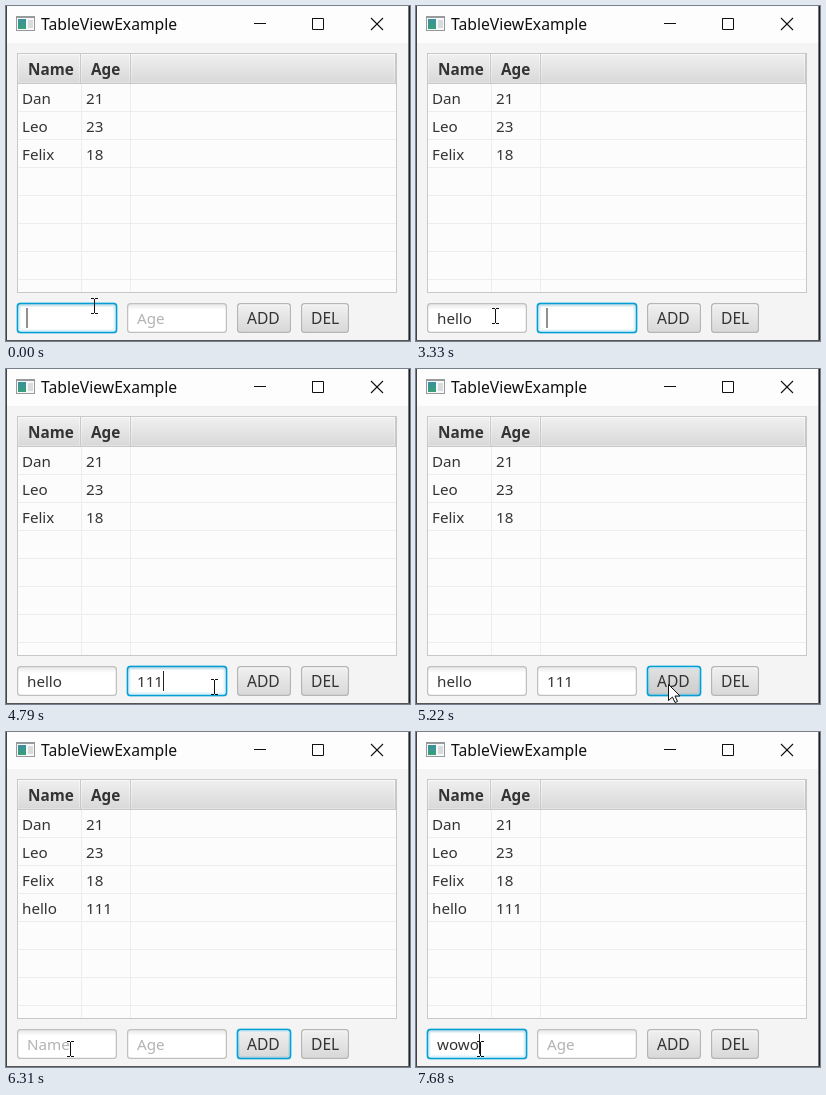
These frames come from a looping animation (404 by 335 pixels, 8 s). An HTML page with a canvas:

```html
<!DOCTYPE html>
<html lang="en">
<head>
<meta charset="utf-8">
<title>TableViewExample</title>
<style>
html, body { margin: 0; width: 100%; height: 100%; overflow: hidden; background: #f4f4f4; }
canvas { display: block; }
</style>
</head>
<body>
<canvas id="stage" width="404" height="335"></canvas>
<script>
const c = document.getElementById('stage').getContext('2d');
const LOOP = 8000;
const TICK = 130;
const BLINK = 520;
const SIZE = 15.2;
const FACE = '"Noto Sans", "Open Sans", sans-serif';
const BLUE = '#039ed3';
const FAINT = '#039ed322';

// Pointer stops: time, x, y
const stops = [
  [0, 88, 300], [520, 79, 310], [3770, 79, 310], [4160, 171, 321], [4550, 186, 320],
  [4940, 252, 315], [5590, 252, 315], [5850, 245, 315], [6110, 93, 308], [6240, 64, 317]
];

// User actions: time, focused control, name text, age text, mouse held
const actions = [
  [-370, 'name', '', ''],
  [2230, 'name', '', ''],
  [2740, 'name', 'hello', ''],
  [3330, 'age', 'hello', ''],
  [4010, 'age', 'hello', '1'],
  [4160, 'age', 'hello', '11'],
  [4280, 'age', 'hello', '111'],
  [5220, 'add', 'hello', '111', true],
  [5340, 'add', '', ''],
  [6430, 'name', '', '', true],
  [6580, 'name', '', ''],
  [7290, 'name', 'w', ''],
  [7560, 'name', 'wow', ''],
  [7680, 'name', 'wowo', '']
];

const looks = {
  plain: ['#efefef', '#d9d9d9'],
  hover: ['#f6f6f6', '#e2e2e2'],
  down: ['#e1e1e1', '#cdcdcd']
};
const people = [['Dan', '21'], ['Leo', '23'], ['Felix', '18'], ['hello', '111']];

function pointerAt(t) {
  const now = Math.floor(t / TICK) * TICK;
  const i = stops.findLastIndex(s => s[0] <= now);
  const [t0, x0, y0] = stops[i];
  const [t1, x1, y1] = stops[i + 1] || [LOOP, x0, y0];
  const k = (now - t0) / (t1 - t0);
  return [Math.round(x0 + (x1 - x0) * k), Math.round(y0 + (y1 - y0) * k)];
}

function rect(x, y, w, h, fill) {
  c.fillStyle = fill;
  c.fillRect(x, y, w, h);
}

// Rounded control layer, 30 px high, shrunk by an inset
function layer(x, w, inset, r, fill) {
  c.fillStyle = fill;
  c.beginPath();
  c.roundRect(x + inset, 297 + inset, w - 2 * inset, 30 - 2 * inset, r);
  c.fill();
}

function text(s, x, y, fill = '#333', size = SIZE, weight = 400) {
  c.font = `${weight} ${size}px ${FACE}`;
  c.fillStyle = fill;
  c.fillText(s, x, y);
}

function shade(y, h, [top, bottom]) {
  const g = c.createLinearGradient(0, y, 0, y + h);
  g.addColorStop(0, top);
  g.addColorStop(1, bottom);
  return g;
}

function line(points, color, width = 1) {
  c.strokeStyle = color;
  c.lineWidth = width;
  c.beginPath();
  for (const [x, y] of points) c.lineTo(x, y);
  c.stroke();
}

function drawWindow() {
  rect(0, 0, 404, 335, '#f4f4f4');
  rect(0, 0, 404, 37, '#fdfdfd');
  rect(10, 10, 19, 15, '#969a9c');
  rect(11, 12, 17, 12, '#f8f8f8');
  rect(12, 13, 8, 10, shade(13, 10, ['#3e8f9f', '#36a078']));
  rect(22, 14, 5, 8, '#d9dcdd');
  text('TableViewExample', 35, 24, '#111', 15.7);
  rect(248, 17, 12, 1, '#111');
  line([[306.5, 12.5], [317.5, 12.5], [317.5, 23.5], [306.5, 23.5], [306.5, 12]], '#111');
  line([[365, 12], [377, 24]], '#111', 1.1);
  line([[377, 12], [365, 24]], '#111', 1.1);
  rect(0, 0, 1, 335, '#444');
  rect(402, 0, 1, 335, '#777');
  rect(403, 0, 1, 335, '#1f1f28');
  rect(0, 334, 404, 1, '#555');
}

function drawHeader(x, end, label) {
  rect(x, 48, end - x, 30, '#c8c8c8');
  rect(x, 48, end - x - 1, 29, shade(48, 29, ['#f9f9f9', '#e2e2e2']));
  rect(x + 1, 49, end - x - 3, 27, shade(49, 27, looks.plain));
  text(label, x + 10, 69, '#333', 15.3, 700);
}

function drawTable(count) {
  rect(11, 47, 380, 240, '#c8c8c8');
  rect(12, 48, 378, 238, '#fcfcfc');
  drawHeader(12, 75, 'Name');
  drawHeader(75, 125, 'Age');
  drawHeader(125, 390, '');
  for (let y = 105; y < 286; y += 28) rect(12, y, 378, 1, '#ededed');
  for (const x of [75, 124]) rect(x, 78, 1, 208, '#ededed');
  people.slice(0, count).forEach(([name, age], i) => {
    text(name, 16, 98 + 28 * i);
    text(age, 80, 98 + 28 * i);
  });
}

function drawField(x, prompt, value, focused, caretOn) {
  const inner = shade(298, 6, ['#e8e8e8', '#fff']);
  layer(x, 100, focused ? -0.25 : 0, 3.5, focused ? BLUE : '#c0c0c0');
  layer(x, 100, 1.25, 2.5, inner);
  if (focused) {
    layer(x, 100, -1, 4.5, FAINT);
    layer(x, 100, 3.5, 0, '#fff');
  }
  if (value) text(value, x + 10, 318);
  else if (!focused) text(prompt, x + 10, 318, '#b3b3b3');
  if (caretOn && focused) {
    c.font = `400 ${SIZE}px ${FACE}`;
    const end = value ? Math.round(x + 10 + c.measureText(value).width) : x + 9.5;
    rect(end, 302, 1, 20, '#222');
  }
}

function drawButton(x, w, label, look, focused) {
  const body = shade(299, 26, looks[look]);
  layer(x, w, focused ? -0.25 : 0, 3.5, focused ? BLUE : '#b5b5b5');
  layer(x, w, 1.25, 2.5, shade(298, 28, ['#fafafa', looks[look][1]]));
  layer(x, w, 2.5, 1.5, body);
  if (focused) {
    layer(x, w, -1, 4.5, FAINT);
    layer(x, w, 3, 1.5, body);
  }
  text(label, x + 10, 318, '#333', 15.6);
}

function drawArrow(x, y) {
  c.beginPath();
  for (const [dx, dy] of [[0, 0], [0, 16], [4, 12.5], [6.5, 18], [9, 17], [6.5, 11.5], [11.5, 11.5]])
    c.lineTo(x + 0.5 + dx, y + 0.5 + dy);
  c.closePath();
  c.fillStyle = '#fff';
  c.fill();
  c.strokeStyle = '#111';
  c.lineWidth = 1;
  c.stroke();
}

function drawBeam(x, y) {
  rect(x, y - 7, 1, 14, '#111');
  for (const dy of [-8, 7]) {
    rect(x - 3, y + dy, 3, 1, '#111');
    rect(x + 1, y + dy, 3, 1, '#111');
  }
}

function draw(now) {
  const t = now % LOOP;
  const [since, focus, name, age, held] = actions.findLast(a => a[0] <= t);
  const caretOn = !held && Math.floor((t - since) / BLINK) % 2 === 0;
  const [x, y] = pointerAt(t);
  const hover = x >= 231 && x < 285;
  const look = !hover ? 'plain' : held ? 'down' : 'hover';
  drawWindow();
  drawTable(t < 5340 ? 3 : 4);
  drawField(11, 'Name', name, focus === 'name', caretOn);
  drawField(121, 'Age', age, focus === 'age', caretOn);
  drawButton(231, 54, 'ADD', look, focus === 'add');
  drawButton(295, 48, 'DEL', 'plain', false);
  (x < 221 ? drawBeam : drawArrow)(x, y);
}

const start = performance.now();
function tick() {
  draw(performance.now() - start);
  requestAnimationFrame(tick);
}
tick();
</script>
</body>
</html>
```
